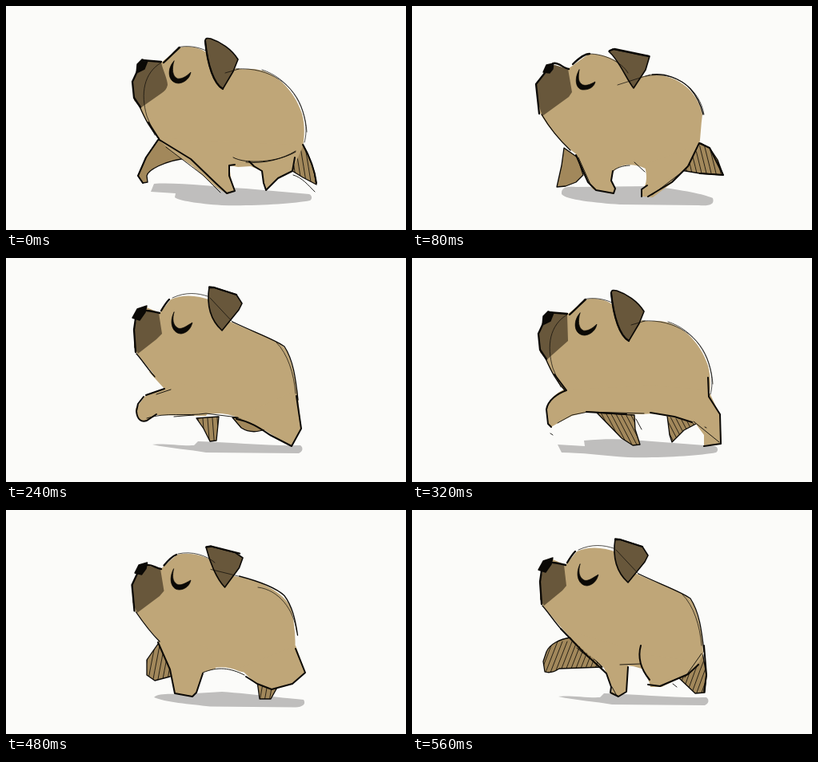
Write an HTML page with a canvas that moves like this. It is 500 px wide and 281 px high and loops after 0.64 s.

```html
<!DOCTYPE html>
<html lang="en">
<head>
<meta charset="utf-8">
<title>Trotting pup</title>
<style>
html, body { margin: 0; width: 100%; height: 100%; overflow: hidden; background: #fbfbf9; }
canvas { display: block; width: 500px; height: 281px; }
</style>
</head>
<body>
<canvas id="stage" width="500" height="281"></canvas>
<script>
const ctx = document.getElementById('stage').getContext('2d');
const STEP_MS = 80;
const TAN = '#bfa678', SHADE = '#a2885b', DARK = '#68573b', INK = '#0b0906', SHADOW = '#bfbebd';

// Torso poses: legs are added per step.
const reach = {
  shadow: 'M181,233L185,223C215,221 260,227 300,229L379,236C383,238 383,242 380,244C360,248 310,251 270,250C240,248 215,244 211,240L212,235Z',
  body: 'M166,125L158,95L171,68L194,71L217,52C230,49 245,52 255,62C265,76 285,80 305,79C333,78 360,104 370,135C374,150 373,165 371,176C360,192 325,195 304,195C290,196 282,196 279,196C240,197 200,180 190,166C180,152 172,140 166,125Z',
  muzzle: 'M171,68L194,71C196,80 202,92 202,99C201,104 198,107 195,109L168,128L160,118L158,94Z',
  nose: 'M163,84L164,73L170,67L177,69L173,79Z',
  eye: 'M210,69C200,80 203,97 216,97C224,96 230,90 231,83C225,89 219,92 214,91C208,88 207,79 210,69Z',
  ear: 'M249,44C249,40 252,40 256,41C268,45 282,54 290,67L284,82L271,104C260,98 252,75 249,44Z',
  bold: 'M197,71C205,64 211,57 217,52M170,68L194,70M164,82L158,95L160,115L168,127M249,44C252,75 260,98 271,104',
  mid: 'M167,126C174,142 180,154 191,166',
  thin: 'M215,52C225,49 240,51 250,56M194,71C172,84 168,110 176,138L186,162M288,79C330,76 362,100 371,132C377,152 375,164 373,171M320,80C352,90 374,122 376,158M274,84L291,79'
};
const squash = {
  shadow: 'M187,236C186,227 194,226 205,227L300,226C340,231 365,236 376,241C379,250 370,251 358,250L260,249C230,247 192,243 187,236Z',
  body: 'M160,134L155,98L168,82L178,74L195,79L221,60C240,60 255,66 270,80C280,92 290,88 300,86C335,86 358,110 363,136C361,150 361,162 359,176C345,205 320,203 292,204C275,196 262,199 250,206C215,200 180,170 160,134Z',
  muzzle: 'M167,84L178,74L195,79L200,108L196,114L163,138L157,120L155,98Z',
  nose: 'M164,83L168,74L177,72L176,79L172,84Z',
  eye: 'M209,80C202,92 205,106 215,105C222,105 228,101 229,95C222,99 216,101 212,98C207,94 208,88 209,80Z',
  ear: 'M246,57L251,54L285,61L297,63L292,80L277,103C268,92 259,68 246,57Z',
  bold: 'M201,73C208,66 215,60 222,60M176,72C184,70 188,78 196,79M166,84L155,98L159,135M247,56L253,54L296,63',
  mid: 'M162,136C172,153 182,166 198,181M300,86C315,84 335,90 348,104C357,114 361,124 364,136',
  thin: 'M222,60C240,60 262,70 270,84M257,99L298,86M292,88C330,80 360,105 365,136'
};
const stretch = {
  shadow: 'M183,234C195,232 220,236 235,235L240,230C280,231 330,236 368,235C372,238 371,243 366,245L250,244C230,240 205,239 183,234Z',
  body: 'M163,119L160,90L165,72L176,62L192,69L206,52C222,45 240,47 256,53C265,70 275,78 285,82C310,93 348,105 352,118C360,140 363,155 364,180C355,208 320,212 292,201C275,194 262,194 245,197C225,190 188,152 163,119Z',
  muzzle: 'M164,74L175,65L191,69L195,95L188,102L165,120L160,112L160,88Z',
  nose: 'M158,75L164,64L176,60L174,68L167,78Z',
  eye: 'M210,68C203,82 209,95 219,95C226,94 231,89 233,81C226,85 220,90 215,88C208,84 208,76 210,68Z',
  ear: 'M254,36L260,37L288,46L295,57L291,65L270,91C258,80 250,62 254,36Z',
  bold: 'M194,66C197,61 200,56 204,52M176,66C182,66 186,68 192,69M162,76L160,90L162,118M254,37L260,37L288,46',
  mid: 'M163,120C170,128 178,140 186,149M283,80C310,93 338,103 348,111C359,128 362,150 365,178',
  thin: 'M208,50C225,42 240,44 252,48M255,50L283,80M338,106C352,120 360,145 362,170'
};

// Averages two poses whose paths share the same commands.
function between(a, b) {
  return Object.fromEntries(Object.keys(a).map(key => {
    const others = b[key].match(/[\d.]+/g);
    let i = 0;
    return [key, a[key].replace(/[\d.]+/g, n => (+n + +others[i++]) / 2)];
  }));
}
const passing = between(squash, stretch);

// plain / far: legs behind the body; near / outline: legs in front; slope: hatch lean.
const steps = [
  { ...reach, slope: -6,
    plain: 'M190,168L175,190L165,213L171,222L177,221L176,213C177,207 195,194 232,190L210,174Z',
    far: 'M371,173C378,185 386,205 388,224L371,215L358,207Q362,190 371,173Z',
    near: 'M188,164L208,184L232,200L262,227L277,236L286,232L281,215L279,200L290,202L306,201L320,207L322,222L325,231L340,216L358,206L372,174L250,170Z',
    outline: 'M178,146L192,168L231,192L262,222L276,235L286,232L279,213L279,200L286,199M304,195L310,201L320,207L322,222L325,231L340,216L358,207L361,190M190,168L175,190L165,213L171,222M371,174C380,190 386,205 388,222',
    detail: 'M284,190C300,199 340,196 362,183M300,196C325,198 345,192 362,182M200,177L246,212L268,234M359,212C370,215 378,225 386,233' },
  { ...squash, slope: -9,
    plain: 'M190,178L187,200L181,227L192,226L205,221L214,212L207,190Z',
    far: 'M358,175L361,172L372,178L382,193L389,212L360,210L336,206Z',
    near: 'M203,180L215,212L226,230L252,236L255,230C247,222 247,206 260,202L250,180ZM290,198C294,210 295,224 287,232L288,239L301,240L325,222L345,200L360,174Z',
    outline: 'M205,187L220,221L230,231L252,235L254,229L249,219L251,207M294,225L287,230L287,239M295,239L325,221L345,201L359,172L372,178L389,212L360,210',
    detail: 'M251,207C258,201 268,200 272,200M278,196L291,208M208,190L224,226M300,237L338,208' },
  { ...passing, slope: 5, plain: '',
    far: 'M215,200L218,221L221,232L235,232L244,202ZM322,205L341,223L358,218L366,194Z',
    near: 'M184,158L180,190L180,209L188,216L202,214L220,203L255,200L240,170ZM296,201L312,217L316,237L331,239L350,216L363,168Z',
    outline: 'M190,173L180,190L180,209L188,216L202,214L220,204L255,200M297,204L312,217L316,237L331,239L350,216L362,170',
    detail: 'M255,200C270,195 282,198 297,204' },
  { ...stretch, slope: -3,
    plain: 'M283,200L294,213Q308,222 326,214L310,202Z',
    far: 'M238,201L247,214L255,230L263,229L266,199Z',
    near: 'M178,142L198,164L174,173L162,189C163,202 168,207 176,204L188,197L250,198L270,170L198,152ZM290,199L320,214L357,237L369,214L364,165Z',
    outline: 'M198,164L175,172M163,192L165,183L172,174M163,192C164,204 170,206 176,204L188,196M288,202C305,205 318,214 330,222L357,236L369,214L363,173',
    detail: 'M176,201C200,193 225,199 250,195L290,200M188,171L206,165M210,199L235,197' },
  { ...reach, slope: -20,
    shadow: 'M182,234L216,236L215,229C245,226 270,227 300,230L379,236C383,238 383,242 380,244C360,248 310,251 270,250C240,248 210,244 187,244Z',
    muzzle: 'M171,68L194,71L195,104L168,128L160,118L158,94Z', plain: '',
    far: 'M231,194L262,226L276,235L285,234L279,215L278,197ZM319,198L322,222L325,231L340,216L357,207L330,198Z',
    near: 'M190,165C178,170 168,182 168,192L170,208L174,212L186,205L200,198L220,193L280,196L300,194L354,207L365,222L365,235L387,233L385,197L370,165L300,160Z',
    outline: 'M178,146L193,166C182,170 170,178 168,190L170,208L174,212M218,193L268,196M298,194L328,199L350,206M370,150L371,174L385,196L386,233L365,236',
    detail: 'M182,207L200,197L220,193L290,195M352,205L384,231M280,202L287,215M173,220L176,222M366,212L368,213' },
  { ...squash, slope: -5,
    muzzle: 'M167,84L178,74L190,79L191,112L186,125L162,137L157,120L155,98Z', plain: '',
    far: 'M228,209L237,225L252,231L256,225L256,201L236,202ZM285,198L291,212L286,237L293,239L305,234L325,222L330,208Z',
    near: 'M186,165L190,202L179,224L182,230L205,228C215,222 222,208 240,201L280,196L298,207L345,207L384,213L388,209L372,178L358,172L300,160Z',
    outline: 'M193,180L190,203L178,222L180,229L203,228L212,221L222,208M296,206L325,209L345,206L388,212M389,210L372,180L354,174',
    detail: 'M212,220C223,204 250,197 284,196L300,208M290,201L350,205M365,140C364,158 360,168 354,177M197,219L196,223M219,226L221,227' },
  { ...passing, slope: 7, plain: '',
    far: 'M190,168L176,188L176,207L186,214L205,209L232,199ZM300,202L314,215L317,237L331,237L346,210Z',
    near: 'M190,164L205,200L211,230L233,234L238,229L246,204L262,199L250,170ZM292,198L312,218L332,225L358,218L374,203L362,170Z',
    outline: 'M190,166L205,200L211,230L233,234L238,229L246,205M300,209L314,218L332,225L358,218L374,204L362,174',
    detail: 'M246,204C265,196 280,198 298,207' },
  { ...stretch, slope: 14,
    muzzle: 'M164,74L175,65L190,69L193,95L188,101L165,120L160,112L160,88Z', plain: '',
    far: 'M198,160C185,162 172,168 168,178L164,190L166,203C172,205 178,203 184,199L238,197L210,168ZM363,178L368,207L366,229L354,230L334,211Z',
    near: 'M190,150L240,198L250,222L249,231L258,234L268,228L270,195L287,194L260,170ZM284,180L287,195L297,217L298,222L312,222L345,206L360,190Z',
    outline: 'M186,149L214,178L243,205L249,222L248,229L258,234L268,228L270,197M286,170C281,188 288,202 297,213M295,219L310,221L345,206L358,194M365,170L368,207L365,228',
    detail: 'M206,173L240,201M260,194L286,193M250,222L256,233M326,218L331,222M362,180L341,210' }
];

function fill(path, color) {
  ctx.fillStyle = color;
  ctx.fill(new Path2D(path));
}
function ink(path, width) {
  ctx.lineWidth = width;
  ctx.strokeStyle = INK;
  ctx.stroke(new Path2D(path));
}
function hatch(path, slope) {
  ctx.save();
  ctx.clip(new Path2D(path));
  for (let x = 150; x < 410; x += 6) ink(`M${x + slope},165Q${x},200 ${x - slope},240`, 0.8);
  ctx.restore();
}

function draw(s) {
  ctx.fillStyle = '#fbfbf9';
  ctx.fillRect(0, 0, 500, 281);
  fill(s.shadow, SHADOW);
  for (const leg of [s.plain, s.far]) {
    fill(leg, SHADE);
    ink(leg, 1.3);
  }
  hatch(s.far, s.slope);
  fill(s.body, TAN);
  fill(s.near, TAN);
  fill(s.muzzle, DARK);
  fill(s.ear, DARK);
  ink(s.ear, 1.6);
  ink(s.thin, 0.7);
  ink(s.detail, 0.9);
  ink(s.mid, 1.3);
  ink(s.outline, 2);
  ink(s.bold, 2.3);
  fill(s.nose, INK);
  ink(s.nose, 1.4);
  fill(s.eye, INK);
  ink(s.eye, 0.7);
}

ctx.lineCap = ctx.lineJoin = 'round';
function tick() {
  draw(steps[Math.floor(performance.now() / STEP_MS) % steps.length]);
  requestAnimationFrame(tick);
}
tick();
</script>
</body>
</html>
```
